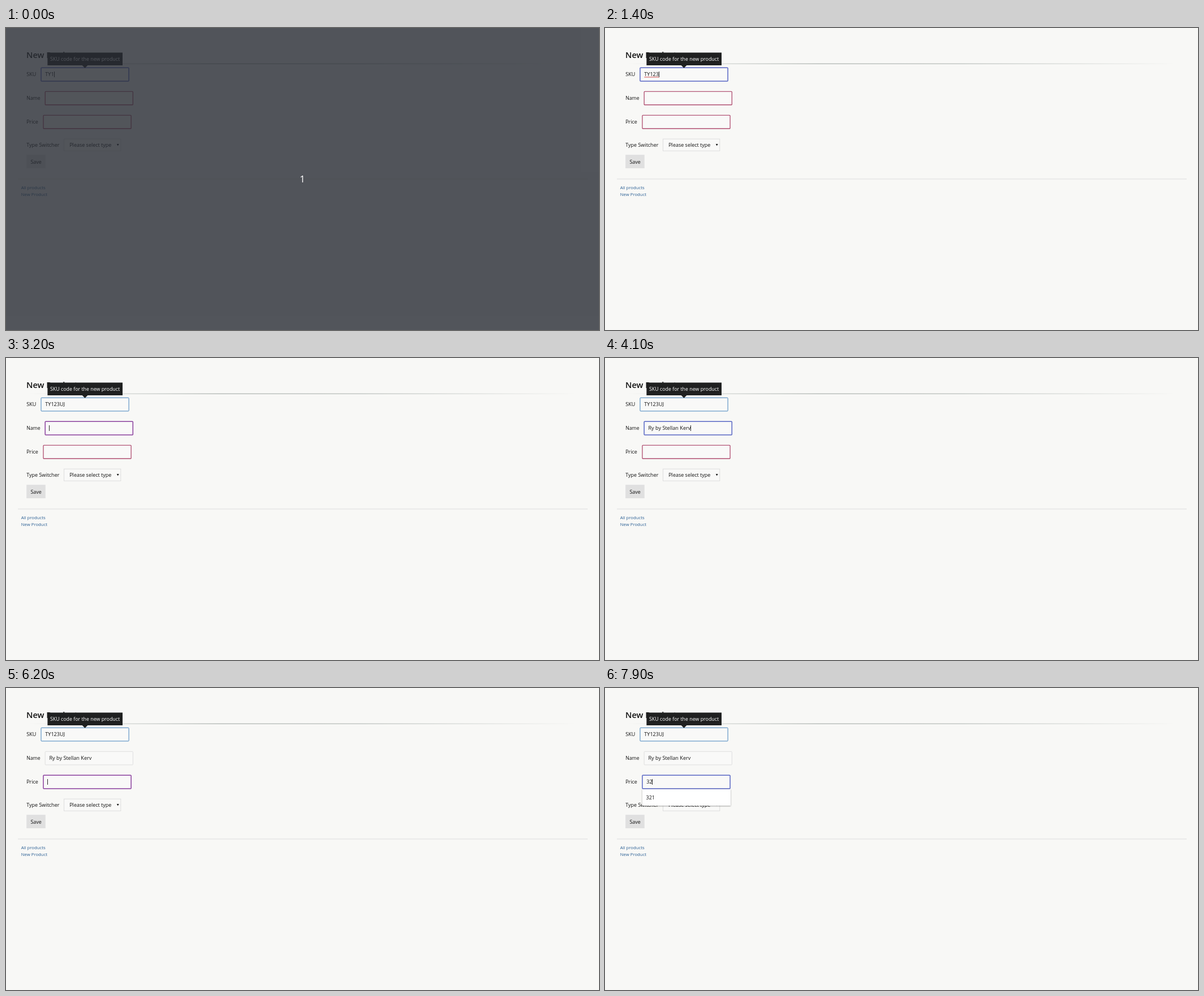
An HTML page for the animation above (8 s loop, 1048 by 534 pixels).

```html
<!DOCTYPE html>
<html lang="en">
<head>
<meta charset="utf-8">
<title>New Product form</title>
<style>
  html, body { margin: 0; width: 100%; height: 100%; overflow: hidden; background: #f8f8f6; }
  svg { display: block; width: 100vw; height: 100vh; font: 9px "Open Sans", "Noto Sans", sans-serif; fill: #111; }
  .link { font-size: 7.75px; fill: #2a5f94; }
  .field { fill: #f9f9f8; }
</style>
</head>
<body>
<svg viewBox="0 0 1048 534">
  <defs>
    <linearGradient id="fade">
      <stop offset="0" stop-color="#9aa29e" stop-opacity="0"/>
      <stop offset=".35" stop-color="#9aa29e"/>
      <stop offset=".6" stop-color="#9aa29e" stop-opacity=".85"/>
      <stop offset="1" stop-color="#9aa29e" stop-opacity="0"/>
    </linearGradient>
    <filter id="shadow" x="-5%" y="-10%" width="110%" height="130%">
      <feDropShadow dx="0" dy=".8" stdDeviation=".8" flood-opacity=".4"/>
    </filter>
  </defs>
  <rect width="1048" height="534" fill="#f8f8f6"/>

  <text x="36" y="52.8" font-size="14.6" font-weight="600">New Product</text>
  <rect x="36" y="62.7" width="976" height="1" fill="url(#fade)"/>

  <text x="36.2" y="85.4">SKU</text>
  <text x="36.2" y="127.4" font-size="8.7">Name</text>
  <text x="36.2" y="169.4">Price</text>
  <g id="fields"></g>

  <text x="36.2" y="210">Type Switcher</text>
  <rect x="102.5" y="196.2" width="100.3" height="21" class="field" stroke="#dadada" stroke-width=".9"/>
  <text x="112.2" y="210">Please select type</text>
  <path d="M195.8 205h3.8l-1.9 3.4z"/>

  <rect x="36.2" y="224.2" width="33.6" height="23.8" fill="#e0e0e0"/>
  <text x="43.4" y="239.6">Save</text>

  <rect x="21" y="266.5" width="1007" height="1" fill="#dededd"/>
  <text x="26.7" y="284.8" class="link">All products</text>
  <text x="26.7" y="296.8" class="link">New Product</text>

  <path d="M73.4 43.4H206V66H144.3L139.5 70.8L134.7 66H73.4z" fill="#1f2020"/>
  <text x="78" y="58.3" font-size="8.85" fill="#fff">SKU code for the new product</text>

  <path id="typo" d="M69.3 86.9H95.7" stroke="#d23c3c" stroke-width=".9"/>
  <g id="popup">
    <rect x="66" y="179" width="156" height="29" fill="#fff" filter="url(#shadow)"/>
    <text x="72.5" y="196.5" font-weight="500">321</text>
  </g>
  <rect id="caret" width=".9" height="10"/>

  <g id="veil">
    <rect width="1048" height="534" fill="#282c34" fill-opacity=".8"/>
    <text x="523.8" y="273" font-size="17" text-anchor="middle" fill="#fff">1</text>
  </g>
</svg>
<script>
const LOOP = 8000;
const $ = id => document.getElementById(id);

// border colour and width per field state
const STYLES = {
  idle: ['#dcdcdc', .9],
  hover: ['#4584bd', 1],
  invalid: ['#a32f58', 1.1],
  focus: ['#5866c4', 1.5],
  focusInvalid: ['#8a3f9d', 1.5]
};

function make(tag, attrs) {
  const el = document.createElementNS('http://www.w3.org/2000/svg', tag);
  for (const key in attrs) el.setAttribute(key, attrs[key]);
  return $('fields').appendChild(el);
}

const fields = [[62, 70.3], [69.2, 112.3], [66, 154.3]].map(([x, y]) => ({
  y,
  box: make('rect', { x, y, width: 155.1, height: 23.6, rx: 1, class: 'field' }),
  text: make('text', { x: x + 7.3, y: y + 15.1, 'font-size': 9.1 })
}));

const TITLE = 'Ry by Stellan Kerv';

// time, active field, value, caret x
const EDITS = [
  [0, 0, 'TY1', 85],
  [100, 0, 'TY12', 90],
  [200, 0, 'TY123', 95],
  [2100, 0, 'TY123U', 101],
  [2400, 0, 'TY123UJ', 106],
  [3200, 1, '', 76],
  [4100, 1, TITLE, 151],
  [5100, 2, '', 73],
  [7400, 2, '3', 78],
  [7900, 2, '32', 83]
];
const DONE = ['TY123UJ', TITLE];
const BLINKS = [[800, 1400], [3600, 4100], [4600, 5100], [5600, 6200], [6800, 7400]];

const within = (t, [from, to]) => t >= from && t < to;
const show = (id, on) => $(id).setAttribute('visibility', on ? 'visible' : 'hidden');

function fieldState(i, active, value) {
  if (i === active) return value ? 'focus' : 'focusInvalid';
  if (i > active) return 'invalid';
  return i === 0 ? 'hover' : 'idle';
}

function render(t) {
  const [, active, value, caretX] = EDITS.filter(e => e[0] <= t).pop();
  fields.forEach((f, i) => {
    const [color, width] = STYLES[fieldState(i, active, value)];
    f.box.setAttribute('stroke', color);
    f.box.setAttribute('stroke-width', width);
    f.text.textContent = i < active ? DONE[i] : i === active ? value : '';
  });
  $('caret').setAttribute('x', caretX);
  $('caret').setAttribute('y', fields[active].y + 6.7);
  show('caret', !BLINKS.some(b => within(t, b)));
  show('typo', within(t, [1200, 2100]));
  show('popup', t >= 7500);
  show('veil', t < 100);
}

const start = performance.now();
function tick() {
  render((performance.now() - start) % LOOP);
  requestAnimationFrame(tick);
}
tick();
</script>
</body>
</html>
```
